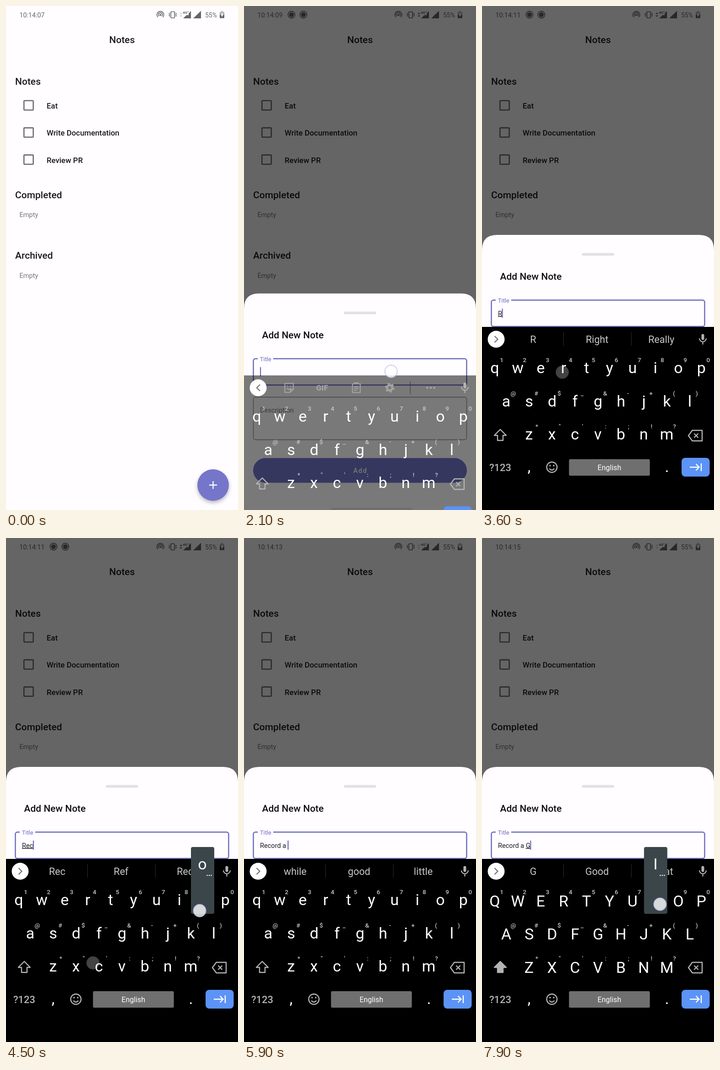
Write an HTML page that moves like this. It is 508 by 1101 pixels and loops after 8 s.

```html
<!DOCTYPE html>
<html lang="en">
<head>
<meta charset="utf-8">
<title>Notes</title>
<style>
  html, body { margin: 0; width: 100%; height: 100%; overflow: hidden; background: #fffdff; }
  svg { display: block; width: 100vw; height: 100vh; }
  text { font-family: Roboto, sans-serif; font-size: 14.6px; white-space: pre; }
  .mid { text-anchor: middle; }
  .head { font-size: 21px; font-weight: 500; fill: #1b1a1d; }
  .item { font-size: 16.85px; font-weight: 500; fill: #1b1a1d; }
  .muted { fill: #757477; }
  .status { font-size: 14.3px; fill: #666568; }
  .box { fill: none; stroke: #6e6d70; stroke-width: 2.6; }
  .field { fill: none; stroke: #8e8d90; stroke-width: 1.3; }
  .field.on { stroke: #6a6cbf; stroke-width: 2.5; }
  .key { font-size: 34px; fill: #fff; text-anchor: middle; }
  .hint { font-size: 13.5px; font-weight: 500; fill: #c6c6c6; text-anchor: middle; }
  .word { font-size: 21.6px; fill: #c8c8c8; text-anchor: middle; }
  .line { fill: none; stroke: #b4b4b4; stroke-width: 2.4; stroke-linejoin: round; }
  .dot { fill: #fffc; stroke: #c6c6e8; stroke-width: 2; stroke-opacity: .8; }
</style>
</head>
<body>
<svg viewBox="0 0 508 1101" preserveAspectRatio="none">
  <defs>
    <filter id="soft" x="-30%" y="-30%" width="160%" height="160%">
      <feDropShadow dx="0" dy="4" stdDeviation="4" flood-opacity=".28"/>
    </filter>
  </defs>

  <g id="page">
    <rect width="508" height="1101" fill="#fffdff"/>
    <g id="status">
      <text class="status" id="clock" x="29.5" y="24.5"></text>
      <g id="records" fill="none" stroke="#666568" stroke-width="1.6">
        <circle cx="104" cy="19" r="7.6"/><circle cx="104" cy="19" r="5.3" fill="#666568" stroke="none"/>
        <circle cx="130" cy="19" r="7.6"/><circle cx="130" cy="19" r="5.3" fill="#666568" stroke="none"/>
      </g>
      <g fill="none" stroke="#666568" stroke-width="1.7">
        <path d="M332.5 24.5a7.6 7.6 0 1 1 11 0M335 22.2a4.4 4.4 0 1 1 6 0"/>
        <rect x="361" y="12.5" width="8" height="13.5" rx="1"/>
        <path d="M358.5 15l-1.5 2 1.5 2-1.5 2 1.5 2M371.500 15l1.500 2-1.500 2 1.500 2-1.500 2" stroke-width="1.3"/>
      </g>
      <circle cx="338" cy="19.500" r="2" fill="#666568"/>
      <path id="up" d="M380 17.500l3-3.500 3 3.500z"/>
      <path id="down" d="M380 20.500l3 3.500 3-3.500z"/>
      <path d="M405 11v16h-17l7-7h5v-4zM427 10.500v16.500h-17z" fill="#666568"/>
      <text x="387" y="17" style="font-size:8px;font-weight:700" fill="#666568">4G⁺</text>
      <text class="status" x="436" y="24.500" style="font-size:14px">55%</text>
      <path d="M468 13h3v-2h4v2h3v6h-10z" fill="#b5b4b7"/>
      <path d="M468 18.500h10v8h-10z" fill="#666568"/>
      <path d="M474 14l-4 6.500h2.500v4l4-6.500h-2.500z" fill="#fffdff"/>
    </g>
    <text class="head mid" x="254" y="80.500">Notes</text>
    <text class="head" x="20" y="171.500">Notes</text>
    <rect class="box" x="39.300" y="206.800" width="20.400" height="20.400" rx="1.500"/>
    <rect class="box" x="39.300" y="266.100" width="20.400" height="20.400" rx="1.500"/>
    <rect class="box" x="39.300" y="325.400" width="20.400" height="20.400" rx="1.500"/>
    <text class="item" x="89" y="224">Eat</text>
    <text class="item" x="89" y="283.300">Write Documentation</text>
    <text class="item" x="89" y="342.600">Review PR</text>
    <text class="head" x="20" y="420">Completed</text>
    <text class="muted" x="29.500" y="461">Empty</text>
    <text class="head" x="20" y="552">Archived</text>
    <text class="muted" x="29.500" y="593.500">Empty</text>
    <circle cx="453.500" cy="1046.500" r="34.500" fill="#7476ca" filter="url(#soft)"/>
    <path d="M445 1046.500h17M453.500 1038v17" stroke="#fff" stroke-width="2.300"/>
  </g>

  <rect id="scrim" width="508" height="1101"/>

  <g id="sheet">
    <path d="M0 700V33Q0 0 33 0H475Q508 0 508 33V700z" fill="#fffdff"/>
    <rect x="218.500" y="39.500" width="71" height="6" rx="3" fill="#e3e1e4"/>
    <text class="head" x="39.500" y="97.500" style="fill:#0f0e10">Add New Note</text>
    <rect class="field" id="title" x="20.500" y="142.500" width="467" height="57.500" rx="4.500"/>
    <rect id="notch" x="30" y="139" width="34" height="7" fill="#fffdff"/>
    <text id="label" x="35"></text>
    <text id="typed" x="35" y="176.500" fill="#1b1a1d"><tspan></tspan><tspan text-decoration="underline"></tspan></text>
    <rect id="caret" y="161" width="2.200" height="20" fill="#6a6cbf"/>
    <rect class="field" x="20.500" y="226.500" width="467" height="93" rx="4.500"/>
    <text class="muted" x="35" y="259.500">Description</text>
    <rect x="20" y="359.500" width="468" height="54" rx="27" fill="#7274c8"/>
    <text class="mid" x="255" y="392" fill="#fff" style="font-size:14.300px;font-weight:500;letter-spacing:1.700px">Add</text>
  </g>

  <g id="keyboard">
    <rect id="board" y="701" width="508" height="520"/>
    <rect id="shiftGlow" x="5" y="908" width="70" height="59" rx="6" fill="#2b2b2b"/>
    <g id="keys"></g>
    <path class="line" id="shift" d="M40 925l13 13h-7v11h-12v-11h-7z"/>
    <g class="line">
      <path d="M452 938.500l8.500-11.500h21.500v23h-21.500zM464.500 934l9 9M473.500 934l-9 9"/>
      <circle cx="153" cy="1007.500" r="11.300"/>
      <path d="M147.500 1010.500q5.500 6.500 11 0"/>
    </g>
    <g fill="#b4b4b4"><circle cx="149" cy="1004" r="1.800"/><circle cx="157" cy="1004" r="1.800"/></g>
    <text class="mid" x="40" y="1016" fill="#b4b4b4" style="font-size:22px;font-weight:500">?123</text>
    <text class="key" x="103" y="1018">,</text>
    <text class="key" x="405" y="1018">.</text>
    <rect id="space" x="190.500" y="990" width="177" height="36" rx="3"/>
    <text class="mid" x="279" y="1014" fill="#fff" style="font-size:16px">English</text>
    <rect x="437" y="987" width="61.500" height="41" rx="8" fill="#5c93f6"/>
    <path d="M455 1007.500h20M468.500 1000.500l7 7-7 7M480 999v17" fill="none" stroke="#fff" stroke-width="2.400"/>

    <circle cx="31" cy="728" r="18.500" fill="#fff"/>
    <path id="chevron" fill="none" stroke="#77777b" stroke-width="2.400"/>
    <g fill="none" stroke="#b4b4b4" stroke-width="2.200">
      <rect x="480.500" y="716.500" width="6" height="13" rx="3" fill="#b4b4b4" stroke="none"/>
      <path d="M476 726a7.500 7.500 0 0 0 15 0M483.500 733.500v6"/>
    </g>
    <g id="tools" fill="none" stroke="#a3a3a3" stroke-width="2.200">
      <path d="M89.500 718.500h18.500v13l-6.500 6.500h-12zM101.500 738v-6.500h6.500M94 729q4.500 5 9 0M94 723.500h2M101 723.500h2"/>
      <text class="mid" x="171" y="734" fill="#a3a3a3" stroke="none" style="font-size:17px;font-weight:900">GIF</text>
      <path d="M237.500 719.500h17v19h-17zM241 725.500h10M241 729.500h10M241 733.500h6M242.500 719.500v-2.500h7v2.500"/>
      <circle cx="319" cy="728" r="5.700" stroke-width="4.600"/>
      <circle cx="319" cy="728" r="9" stroke-width="3" stroke-dasharray="4.700 4.725"/>
      <path d="M364 714v28" stroke="#333" stroke-width="1"/>
      <g fill="#a3a3a3" stroke="none"><circle cx="401.500" cy="728" r="2.400"/><circle cx="409" cy="728" r="2.400"/><circle cx="416.500" cy="728" r="2.400"/></g>
    </g>
    <g id="words">
      <path d="M178.500 713v29M327 713v29" stroke="#303030"/>
      <text class="word" x="112" y="736"></text>
      <text class="word" x="252" y="736"></text>
      <text class="word" x="392.500" y="736"></text>
    </g>
    <g id="popup">
      <rect x="-25" y="675" width="51" height="146" rx="4" fill="#3b464b"/>
      <text class="key" y="724"></text>
      <g fill="#fff"><circle cx="10.500" cy="737" r="1.300"/><circle cx="15" cy="737" r="1.300"/><circle cx="19.500" cy="737" r="1.300"/></g>
    </g>
  </g>

  <g id="autofill">
    <rect x="20" y="710" width="242.500" height="59.500" rx="9" fill="#fff"/>
    <rect x="41" y="718.500" width="39" height="39" rx="2" fill="#d32b2b"/>
    <text x="111" y="745.500" fill="#3d4650" style="font-size:14.700px">Autofill with LockFern</text>
  </g>
  <g id="dots"></g>
</svg>

<script>
const LOOP = 8000, STEP = 100, FOCUS = 2100;
const $ = id => document.getElementById(id);
const add = (parent, tag, attrs) => {
  const node = document.createElementNS('http://www.w3.org/2000/svg', tag);
  for (const name in attrs) node.setAttribute(name, attrs[name]);
  return parent.appendChild(node);
};
const show = (id, on) => $(id).setAttribute('opacity', Number(on));
const move = (id, x, y) => $(id).setAttribute('transform', `translate(${x} ${y})`);

// Value of [time, value] points at t, straight between them.
const track = (points, t) => {
  const i = points.findIndex(p => p[0] > t);
  if (i < 0) return points.at(-1)[1];
  if (i === 0) return points[0][1];
  const [t0, v0] = points[i - 1], [t1, v1] = points[i];
  return v0 + (v1 - v0) * (t - t0) / (t1 - t0);
};

const keys = {};
[['qwertyuiop', '1234567890', 28, 15], ['asdfghjkl', '@#$_&-+()', 53, 15.5], ['zxcvbnm', '*"\':;!?', 103, 17]]
  .forEach(([letters, hints, left, gap], row) => [...letters].forEach((char, i) => {
    const x = left + 50.25 * i, y = 802 + 72.6 * row;
    const node = add($('keys'), 'text', { class: 'key', x });
    add($('keys'), 'text', { class: 'hint', x: x + gap, y: 778 + 72.6 * row }).textContent = hints[i];
    keys[char] = { x, y, row, node };
  }));

// Press time, character, delay until it is typed, touch offset from the key centre.
const strokes = [
  [3400, 'R', 200, -3, 8], [3800, 'e', 200, 4, 10], [4300, 'c', 200, -13, -9], [4400, 'o', 200, -6, 22],
  [4900, 'r', 200, 0, 12], [5100, 'd', 200, 2, 6], [5300, ' ', 100, 0, 0], [5500, 'a', 100, -8, 6],
  [5600, ' ', 100, 8, 10], [6700, 'G', 200, 0, 4], [7800, 'I', 200, 10, 8]
].map(([at, char, delay, dx, dy]) => {
  const key = keys[char.toLowerCase()] || { x: 279, y: 1017 };
  return { at, up: at + 100, char, typed: at + delay, key, x: key.x + dx, y: key.y - 10 + dy };
});
const shifts = [2800, 6500, 7600];
const capitals = [[2900, 3600], [6600, 6900], [7700, LOOP]];

const taps = [
  { at: 500, up: 800, x: 462, y: 1047 }, { at: 2000, up: 2300, x: 322, y: 798 },
  ...shifts.map(at => ({ at, up: at + 100, x: 42, y: 938 })), ...strokes
];
taps.forEach(tap => tap.dot = add($('dots'), 'circle', { class: 'dot', cx: tap.x, cy: tap.y, r: 13.5 }));

const suggestions = {
  'R': 'R Right Really', 'Re': 'Re Really Red', 'Rec': 'Rec Ref Red', 'Reco': 'Reco Record Recover',
  'Recor': 'Recor Record Records', 'Record': 'Record Records Recorded', 'Record ': 'a of the',
  'Record a': 'a and at', 'Record a ': 'while good little', 'Record a G': 'G Good Great'
};

function drawStatus(t) {
  const second = 7 + [500, 1500, 2500, 3500, 4600, 5600, 6600, 7600].filter(at => t >= at).length;
  $('clock').textContent = '10:14:' + String(second).padStart(2, '0');
  show('records', track([[0, 0], [300, 1], [5300, 1], [5600, 0]], t));
  const arrow = (id, from) => $(id).setAttribute('fill', t >= from && t < 5600 ? '#666568' : '#c9c8cb');
  arrow('up', 500);
  arrow('down', 1500);
}

function drawSheet(t, text, lastTyped) {
  show('scrim', track([[700, 0], [800, .1], [900, .24], [1000, .46], [1100, .6]], t));
  show('sheet', track([[700, 0], [800, .35], [900, .75], [1000, .94], [1100, 1]], t));
  move('sheet', 0, track([[700, 1000], [800, 800], [900, 681], [1000, 640], [1100, 628],
    [2100, 628], [2200, 575], [2300, 520], [2400, 500]], t));

  const focused = t >= FOCUS;
  $('title').classList.toggle('on', focused);
  show('notch', focused);
  const label = $('label');
  label.textContent = 'Title';
  label.setAttribute('y', focused ? 147.5 : 176.5);
  label.setAttribute('fill', focused ? '#6a6cbf' : '#757477');
  label.style.fontSize = focused ? '12.7px' : '14.6px';

  const split = text.lastIndexOf(' ') + 1;
  const [plain, composing] = $('typed').children;
  plain.textContent = text.slice(0, split);
  composing.textContent = text.slice(split);
  $('caret').setAttribute('x', 35 + (text ? $('typed').getComputedTextLength() - .5 : 0));
  show('caret', focused && Math.floor((t - lastTyped) / 500) % 2 === 0);
}

function drawKeyboard(t, text) {
  show('keyboard', t >= FOCUS);
  move('keyboard', 0, track([[2100, 106], [2200, 50], [2300, 14], [2400, 0]], t));
  show('board', track([[2100, .52], [2200, .78], [2300, .95], [2400, 1]], t));

  const upper = capitals.some(([from, to]) => t >= from && t < to);
  const fit = char => upper ? char.toUpperCase() : char;
  for (const char in keys) {
    keys[char].node.textContent = fit(char);
    keys[char].node.setAttribute('y', keys[char].y + (upper ? 2.5 : 0));
  }
  $('shift').style.fill = upper ? '#b4b4b4' : 'none';
  show('shiftGlow', shifts.some(at => t >= at && t < at + 200));

  const pressed = strokes.findLast(s => t >= s.at && t < s.typed);
  $('space').setAttribute('fill', pressed && pressed.char === ' ' ? '#999' : '#6f6f6f');
  const bubble = pressed && pressed.char !== ' ';
  show('popup', bubble ? 1 : 0);
  if (bubble) {
    move('popup', pressed.key.x, 72.6 * pressed.key.row);
    $('popup').querySelector('text').textContent = pressed.char;
  }

  const hasWords = text in suggestions;
  show('words', hasWords);
  show('tools', !hasWords);
  $('chevron').setAttribute('d', hasWords ? 'M27.500 721l7 7-7 7' : 'M35 721l-7 7 7 7');
  const words = hasWords ? suggestions[text].split(' ') : [];
  $('words').querySelectorAll('text').forEach((node, i) => node.textContent = words[i] || '');
  show('autofill', text ? 0 : track([[2200, 0], [2400, 1]], t));
}

function draw(t) {
  const done = strokes.filter(s => t >= s.typed);
  const text = done.map(s => s.char).join('');
  drawStatus(t);
  drawSheet(t, text, done.length ? done.at(-1).typed : FOCUS);
  drawKeyboard(t, text);
  for (const { at, up, dot } of taps) {
    const opacity = t < at || t >= up + 200 ? 0 : t < up + 100 ? 1 : .33;
    dot.setAttribute('opacity', opacity);
  }
}

function tick() {
  draw(Math.floor(performance.now() % LOOP / STEP) * STEP);
  requestAnimationFrame(tick);
}
tick();
</script>
</body>
</html>
```
